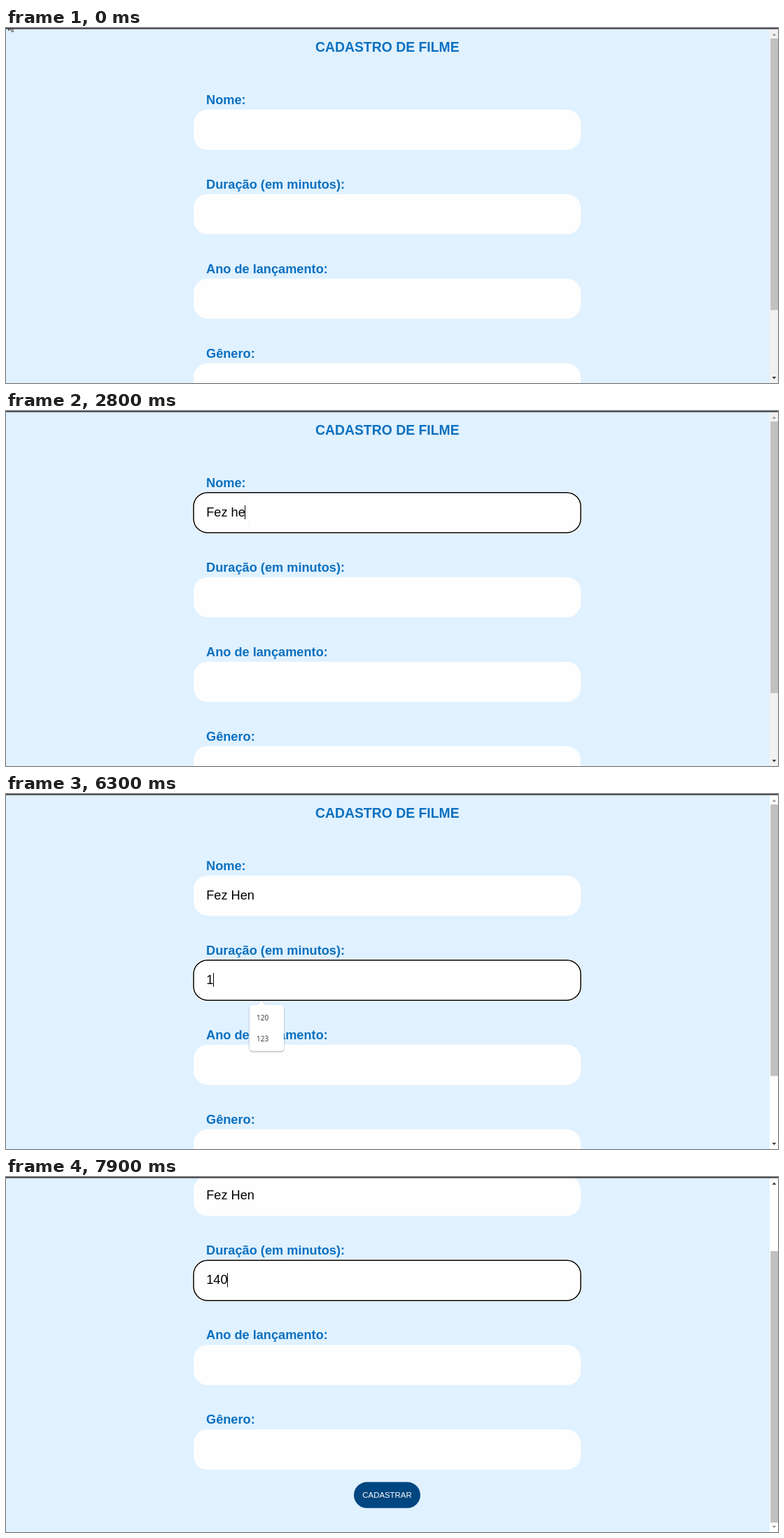
Recreate the animation shown at these times as an HTML page. Size 1103 by 508 pixels, loop 8 s.

```html
<!DOCTYPE html>
<html lang="pt-BR">
<head>
<meta charset="utf-8">
<title>Cadastro de filme</title>
<style>
  html, body { margin: 0; width: 100%; height: 100%; overflow: hidden; background: #e0f1ff; }
  svg { display: block; width: 1103px; height: 508px; }
  text { font-family: "Liberation Sans", Arial, sans-serif; white-space: pre; }
  .title, .label { font-weight: bold; fill: #0a70c0; }
  .title { font-size: 19.4px; text-anchor: middle; }
  .label { font-size: 18.2px; }
  .value { font-size: 18.2px; fill: #000; }
  .button { font-size: 11.4px; fill: #fff; text-anchor: middle; }
  .menu text { font: 10px "Open Sans", "Noto Sans", sans-serif; fill: #333; }
  .menu .box { filter: drop-shadow(0 1px 1.2px rgba(0, 0, 0, .35)); }
</style>
</head>
<body>
<svg id="stage" viewBox="0 0 1103 508"></svg>
<script>
const LOOP = 8000, STEP = 121, LEFT = 286.2;
const stage = document.getElementById('stage');

function add(parent, tag, attrs, text) {
  const el = document.createElementNS('http://www.w3.org/2000/svg', tag);
  for (const key in attrs) el.setAttribute(key, attrs[key]);
  if (text !== undefined) el.textContent = text;
  parent.appendChild(el);
  return el;
}
const show = (el, on) => { el.style.display = on ? '' : 'none'; };

// Form
add(stage, 'rect', { width: 1103, height: 508, fill: '#e0f1ff' });
const page = add(stage, 'g', {});
add(page, 'text', { class: 'title', x: 544.8, y: 34 }, 'CADASTRO DE FILME');
const fields = ['Nome:', 'Duração (em minutos):', 'Ano de lançamento:', 'Gênero:'].map((label, i) => {
  const g = add(page, 'g', { transform: `translate(0 ${i * STEP})` });
  const frame = { x: 268, y: 116.7, width: 553.2, height: 57.5, rx: 20 };
  add(g, 'text', { class: 'label', x: 286, y: 108.8 }, label);
  add(g, 'rect', { ...frame, fill: '#fefefe' });
  const ring = add(g, 'g', { fill: 'none' });
  add(ring, 'rect', { ...frame, stroke: '#fff', 'stroke-width': 3 });
  add(ring, 'rect', { ...frame, stroke: '#000', 'stroke-width': 1.5 });
  const value = add(g, 'text', { class: 'value', x: LEFT, y: 150.8 }, '');
  const caret = add(g, 'rect', { y: 135, width: 1, height: 20, fill: '#000' });
  return { ring, value, caret };
});
add(page, 'rect', { x: 497, y: 555, width: 95, height: 37.2, rx: 18.6, fill: '#004680' });
add(page, 'text', { class: 'button', x: 544.5, y: 577.8 }, 'CADASTRAR');

// Suggestion menus
function makeMenu(field, width, items) {
  const g = add(stage, 'g', { class: 'menu', transform: `translate(348 ${181 + field * STEP})` });
  const h = 7.6 + 29.1 * items.length;
  add(g, 'path', {
    class: 'box', fill: '#fff',
    d: `M4 0H11L17 -6L23 0H${width - 4}q4 0 4 4V${h - 4}q0 4 -4 4H4q-4 0 -4 -4V4q0 -4 4 -4z`
  });
  items.forEach((item, i) => add(g, 'text', { x: 10, y: 22.4 + 29.1 * i }, item));
  return g;
}
const menus = {
  names: makeMenu(0, 146, ['FezHen', 'Fez Hen', 'As Lanternas de Verim', 'Mar de Tijolo', 'Quintal Lunar', 'Olmo e Brita']),
  two: makeMenu(0, 68, ['FezHen', 'Fez Hen']),
  one: makeMenu(0, 68, ['Fez Hen']),
  times: makeMenu(1, 68, ['120', '123', '120 min', '90']),
  short: makeMenu(1, 49, ['120', '123'])
};

// Scrollbar, top edge and pointers
const track = add(stage, 'rect', { x: 1091, width: 12, height: 508 });
const thumb = add(stage, 'rect', { x: 1092.2, width: 10.8, height: 388.6, fill: '#c1c1c1' });
const up = add(stage, 'path', { d: 'M1094.5 11L1097.5 7.6L1100.5 11z' });
const down = add(stage, 'path', { d: 'M1094.5 499L1097.5 502.4L1100.5 499z' });
const beam = add(stage, 'path', { d: 'M345.5 160.5h4M347.5 161v9', stroke: '#f1f1f1', fill: 'none' });
const arrow = add(stage, 'path', {
  d: 'M.5 .5V12.6L3.4 10L5.5 14.6L7.6 13.6L5.6 9.3H9.4z', fill: '#fff', stroke: '#222', 'stroke-width': 1
});
add(stage, 'rect', { width: 1103, height: 1.6, fill: '#3b3b3f' });

// time, field, typed text, caret, menu
const typing = [
  [0, -1, '', 0, ''],
  [700, 0, '', 1, 'names'],
  [1100, 0, '', 0, 'names'],
  [1600, 0, '', 1, 'names'],
  [2000, 0, 'F', 1, 'two'],
  [2100, 0, 'Fe', 1, 'two'],
  [2200, 0, 'Fez', 1, 'two'],
  [2400, 0, 'Fez ', 1, 'one'],
  [2800, 0, 'Fez he', 1, ''],
  [3000, 0, 'Fez hen', 1, ''],
  [3300, 0, 'Fez he', 1, ''],
  [3400, 0, 'Fez h', 1, ''],
  [3500, 0, 'Fez ', 0, ''],
  [3600, 0, 'Fez ', 0, 'one'],
  [3800, 0, 'Fez h', 1, ''],
  [3900, 0, 'Fez he', 1, ''],
  [4200, 0, 'Fez h', 1, ''],
  [4300, 0, 'Fez ', 0, 'one'],
  [4500, 0, 'Fez He', 1, 'one'],
  [4700, 0, 'Fez Hen', 1, ''],
  [5300, 0, 'Fez Hen', 0, ''],
  [5600, 1, '', 1, ''],
  [5800, 1, '', 1, 'times'],
  [6300, 1, '1', 1, 'short'],
  [6700, 1, '14', 1, ''],
  [6800, 1, '140', 1, ''],
  [7400, 1, '140', 0, ''],
  [7900, 1, '140', 1, '']
];
const scrolls = [[0, 0], [7600, 30], [7700, 81], [7800, 110], [7900, 118.4]];
// time, visible, x, y
const pointer = [[0, 1, 3, -9], [200, 1, 111, 48], [300, 0, 0, 0], [7700, 1, 345, 314], [7800, 0, 0, 0]];
const at = (table, t) => table.findLast(row => row[0] <= t);

function draw(t) {
  const [, active, text, caretOn, menu] = at(typing, t);
  const scroll = at(scrolls, t)[1];
  const [, visible, px, py] = at(pointer, t);

  page.setAttribute('transform', `translate(0 ${-scroll})`);
  fields.forEach((f, i) => {
    const focused = i === active;
    f.value.textContent = focused ? text : i === 0 && active === 1 ? 'Fez Hen' : '';
    show(f.ring, focused);
    show(f.caret, focused && caretOn);
    if (focused) f.caret.setAttribute('x', Math.floor(LEFT + (text ? f.value.getComputedTextLength() : 0)));
  });
  for (const key in menus) show(menus[key], key === menu);

  thumb.setAttribute('y', 15 + scroll * .768);
  track.setAttribute('fill', t < 5600 ? '#f1f1f1' : '#fff');
  up.setAttribute('fill', scroll ? '#404040' : '#a3a3a3');
  down.setAttribute('fill', scroll > 118 ? '#a3a3a3' : '#404040');
  show(beam, t >= 700 && t < 5600);
  show(arrow, visible);
  arrow.setAttribute('transform', `translate(${px} ${py})`);
}

const start = performance.now();
function tick() {
  draw((performance.now() - start) % LOOP);
  requestAnimationFrame(tick);
}
tick();
</script>
</body>
</html>
```
